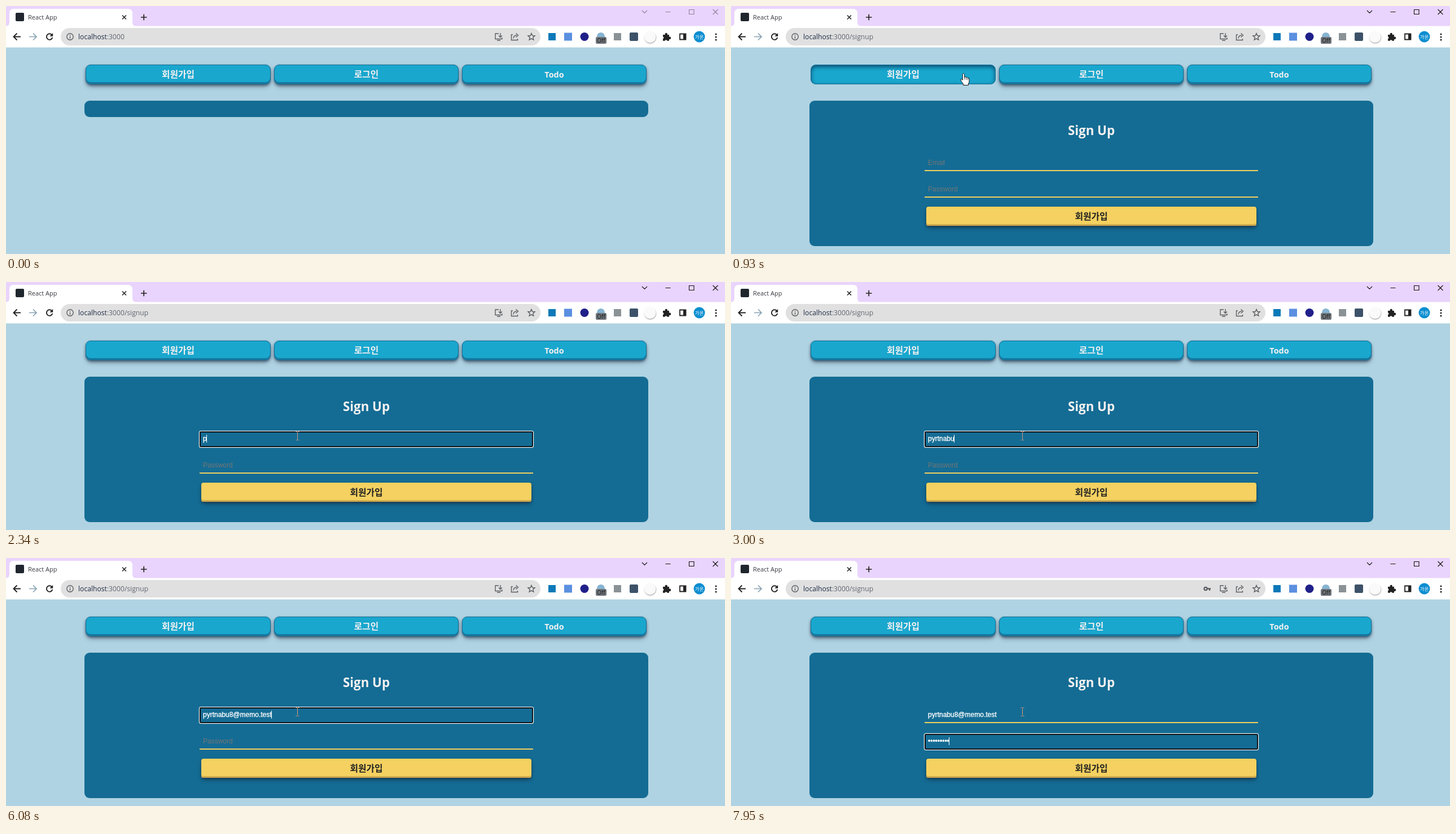
Recreate the animation shown at these times as an HTML page. Size 1274 by 440 pixels, loop 8 s.

```html
<!DOCTYPE html>
<html lang="ko">
<head>
<meta charset="utf-8">
<title>React App</title>
<style>
html, body { margin: 0; width: 100%; height: 100%; overflow: hidden; background: #afd3e2; }
#stage { position: relative; width: 1274px; height: 440px; overflow: hidden; }
#stage > * { position: absolute; box-sizing: border-box; }
svg { left: 0; top: 0; }
.panel { left: 139px; top: 168px; width: 999px; height: 29px; border-radius: 9px; background: #146c94; }
.nav, .submit {
  --k: 0;
  box-shadow:
    0 2px 4px rgba(25, 35, 60, calc(.55 * (1 - var(--k)))),
    0 6px 10px -3px rgba(25, 35, 60, calc(.45 * (1 - var(--k)))),
    inset 0 -3px 0 rgba(20, 90, 130, calc(.6 * (1 - var(--k)))),
    inset 0 3px 7px rgba(10, 65, 100, calc(.9 * var(--k)));
}
.nav { top: 104px; width: 328px; height: 35px; border: 1px solid #146c94; border-radius: 9px; background: #19a7ce; }
.submit {
  left: 346px; top: 356px; width: 585px; height: 34px; border-radius: 4px; background: #f4d160;
  box-shadow: 0 2px 4px rgba(25, 30, 50, .5), 0 6px 10px -3px rgba(25, 30, 50, .45), inset 0 -3px 0 #cfa94d;
}
.line { left: 343px; width: 591px; height: 2px; background: #f4d160; }
.ring {
  left: 342px; width: 593px; height: 30px; border: 1px solid #fff; border-radius: 3px;
  box-shadow: inset 0 0 0 2px #0b0f14, 0 0 1px #fff;
}
text { font-family: "Open Sans", "Noto Sans", "Noto Sans CJK KR", sans-serif; }
.ko { font: 700 15.8px "Noto Sans CJK KR", "Noto Sans CJK", sans-serif; text-anchor: middle; }
.field { font: 12px "Liberation Sans", Arial, sans-serif; }
.typed { fill: #fff; stroke: #fff; stroke-width: .35px; white-space: pre; }
.hint { fill: #757575; }
.ico { fill: none; stroke: #5a5d61; stroke-width: 1.4; }
</style>
</head>
<body>
<div id="stage">
  <div class="panel" id="panel"></div>
  <div class="nav" id="join" style="left:141px"></div>
  <div class="nav" style="left:475px;width:327px"></div>
  <div class="nav" style="left:808px;width:327px"></div>
  <div class="line form" style="top:291px"></div>
  <div class="line form" style="top:338px"></div>
  <div class="submit form"></div>
  <div class="ring" id="ring"></div>

  <svg width="1274" height="440" viewBox="0 0 1274 440">
    <!-- tab strip -->
    <rect width="1274" height="36" fill="#e9d4fd"/>
    <path d="M0 36Q6 36 6 28V13Q6 5 14 5H216Q224 5 224 13V28Q224 36 231 36Z" fill="#fff"/>
    <rect y="35.5" width="1274" height="38" fill="#fff"/>
    <rect x="17" y="12" width="15" height="15" rx="2" fill="#20262e"/>
    <text x="39" y="24" font-size="11" fill="#3a3a40">React App</text>
    <path d="M206 16.500l7 7m0-7l-7 7" stroke="#222" stroke-width="1.6"/>
    <path d="M239 20h10.500M244.250 14.750v10.500" stroke="#222" stroke-width="1.7"/>
    <g id="controls" fill="none" stroke-width="1.1">
      <path d="M1127 8l4.500 4.500 4.500-4.500M1168.500 10.500h9M1210.500 6.500h8.500v8h-8.500zM1252.500 6l9 9m0-9l-9 9"/>
    </g>

    <!-- toolbar -->
    <path d="M26 54.500H14M19.500 48.500l-6 6 6 6" fill="none" stroke="#222" stroke-width="1.9"/>
    <path d="M41 54.500h12M48 48.500l6 6-6 6" fill="none" stroke="#85a0b0" stroke-width="1.7"/>
    <path d="M81.500 51.500a5.300 5.300 0 1 0 .8 4.300" fill="none" stroke="#222" stroke-width="1.9"/>
    <path d="M83.200 48v5.800h-5.800z" fill="#222"/>
    <rect x="97" y="39" width="850" height="31" rx="15.500" fill="#e0e0e0"/>
    <g class="ico">
      <circle cx="113.500" cy="54.500" r="5.700"/>
      <path d="M113.500 53.800v4M113.500 51v1.500"/>
      <path d="M873 49h-6v9.500h12V56M870 61h6M876 48v7M873 52.500l3 3 3-3"/>
      <path d="M898 51h-2.500v9.500h11V58M899 57.500q.5-5.500 6-5.500M903.500 48.500l4 3.500-4 3.500"/>
      <path d="M931 48.500l1.800 4 4.300.4-3.300 2.900 1 4.300-3.800-2.300-3.800 2.300 1-4.300-3.300-2.900 4.300-.4z"/>
      <g id="key"><circle cx="841" cy="54.500" r="2.600" stroke-width="2.200"/><path d="M844 54.500h6M848 54.500v3.300" stroke-width="2.300"/></g>
    </g>
    <text x="128" y="59" font-size="12.150" fill="#5f6670"><tspan fill="#1c2a44">localhost</tspan>:3000<tspan id="path"></tspan></text>

    <rect x="961" y="48" width="13" height="13" fill="#0b79b8"/>
    <rect x="989" y="47.500" width="14" height="14" fill="#5b8fe0"/>
    <circle cx="1025" cy="54.500" r="7.500" fill="#20208a"/>
    <circle cx="1054" cy="54" r="7" fill="#86b4d2"/>
    <rect x="1045" y="55" width="19" height="12" rx="2" fill="#6f7479"/>
    <text x="1054.500" y="65" font-size="10" fill="#16181a" text-anchor="middle">Off</text>
    <rect x="1077" y="48" width="13" height="13" fill="#8b9295"/>
    <rect x="1105" y="47" width="15" height="15" rx="2" fill="#3d5268"/>
    <circle cx="1141.500" cy="56" r="11" fill="#c8c8c8"/>
    <circle cx="1141" cy="54.500" r="10.500" fill="#fafafa"/>
    <path d="M1164 51h3.800a2.200 2.200 0 1 1 3.900 0h3.300v3.800a2.200 2.200 0 1 1 0 3.900v3h-3.500a2.100 2.100 0 0 0-4 0H1164v-3.500a2.100 2.100 0 0 0 0-4z" fill="#222"/>
    <path d="M1194 49.500h10.500v10H1194z" fill="none" stroke="#222" stroke-width="1.800"/>
    <rect x="1200" y="49" width="5" height="11" fill="#222"/>
    <circle cx="1228.500" cy="54.500" r="10" fill="#0b8ed0"/>
    <text class="ko" x="1228.500" y="58" fill="#fff" style="font-size:8.500px;font-weight:400">가온</text>
    <g fill="#222"><circle cx="1258" cy="50" r="1.600"/><circle cx="1258" cy="55" r="1.600"/><circle cx="1258" cy="60" r="1.600"/></g>

    <!-- page -->
    <g fill="#f6f1f1">
      <text class="ko" x="305" y="127.300">회원가입</text>
      <text class="ko" x="638.500" y="127.300">로그인</text>
      <text x="971.500" y="127" font-size="14.400" font-weight="700" text-anchor="middle">Todo</text>
    </g>
    <g class="form">
      <text x="638.500" y="228.500" font-size="22.300" font-weight="700" fill="#f6f1f1" text-anchor="middle">Sign Up</text>
      <text class="field hint" id="mailHint" x="349" y="282">Email</text>
      <text class="field hint" id="passHint" x="349" y="329">Password</text>
      <text class="field typed" id="mail" x="349" y="282"></text>
      <text class="field typed" id="pass" x="349" y="329"></text>
      <rect id="caret" width="1" height="14" fill="#fff"/>
      <text class="ko" x="638.500" y="379.300" fill="#222">회원가입</text>
    </g>

    <!-- pointers, origin at the hot spot -->
    <g id="arrow" fill="#fff" stroke="#111" stroke-width=".9">
      <path d="M0 0V14.500L3.300 11.400 5.600 16.600 7.900 15.600 5.700 10.500H10.300Z"/>
    </g>
    <g id="hand" fill="#fff" stroke="#111" stroke-width="1" stroke-linejoin="round">
      <path d="M-1.700 1.500Q0-1.500 1.700 1.500V7Q3.500 5.300 4.800 7.400 6.600 6.200 7.700 8.300 9.800 7.600 10.100 10V14.500Q9.800 17 8.500 18.500V21H-.3V19Q-2.500 16.500-4.600 12.800-5.600 10.300-3.500 10.200-2.500 10.700-1.700 12Z"/>
      <path d="M1.700 7v4M4.800 7.500v4M7.700 8.500v3.500" fill="none" stroke-width=".8"/>
    </g>
    <g id="beam" fill="none" stroke="#d5997c" stroke-width="1">
      <path d="M-3-7.500H-1L0-6.500 1-7.500H3M0-6.500V6.500M-3 7.500H-1L0 6.500 1 7.500H3"/>
    </g>
  </svg>
</div>
<script>
const LOOP = 8000, FPS = 15;
const ADDRESS = 'pyrtnabu8@memo.test';
const $ = id => document.getElementById(id);
const forms = document.querySelectorAll('.form');

// time, typed text (or how many letters of it), caret visible
const mailSteps = [
  [0, 0, 0], [1600, 0, 1], [2130, 0, 0],
  [2340, 1, 1], [2400, 3, 1], [2470, 'pyroa', 1],
  [2670, 3, 1], [2740, 4, 1], [2800, 5, 1], [2870, 6, 1], [3000, 8, 1],
  [3540, 8, 0], [3870, 9, 1], [4340, 10, 1], [4670, 11, 1], [4740, 12, 1],
  [4880, 13, 1], [5000, 14, 1], [5070, 15, 1], [5610, 15, 0],
  [5740, 16, 1], [5810, 17, 1], [5940, 18, 1], [6080, 19, 1]
];
const passSteps = [
  [0, 0, 1], [6880, 0, 0], [7080, 2, 1], [7210, 3, 1],
  [7480, 4, 1], [7540, 5, 1], [7610, 6, 1], [7880, 8, 1], [7950, 9, 1]
];

// time, x, y, pointer shape
const route = [
  [66, 1180, 426, 'arrow'], [133, 980, 380, 'arrow'], [200, 725, 304, 'arrow'],
  [267, 590, 232, 'arrow'], [333, 495, 166, 'arrow'], [400, 450, 129, 'hand'],
  [467, 428, 123, 'hand'], [600, 412, 119.5, 'hand'], [1000, 412, 119.5, 'hand'],
  [1133, 428, 133, 'hand'], [1200, 450, 152, 'arrow'], [1333, 482, 208, 'arrow'],
  [1467, 494, 246, 'arrow'], [1600, 495, 268, 'beam'], [1670, 500, 269, 'beam'],
  [1870, 516.5, 273, 'beam']
];

const show = (el, on) => { el.style.visibility = on ? 'visible' : 'hidden'; };
const clamp = v => Math.min(1, Math.max(0, v));
const stepAt = (steps, t) => steps.reduce((a, s) => s[0] <= t ? s : a, steps[0]);

function setText(id, s) {
  if ($(id).textContent !== s) $(id).textContent = s;
}

function movePointer(t) {
  const i = route.reduce((a, r, n) => r[0] <= t ? n : a, -1);
  for (const id of ['arrow', 'hand', 'beam']) show($(id), i >= 0 && route[i][3] === id);
  if (i < 0) return;
  const a = route[i], b = route[i + 1] || a;
  const k = b === a ? 0 : (t - a[0]) / (b[0] - a[0]);
  const x = a[1] + (b[1] - a[1]) * k, y = a[2] + (b[2] - a[2]) * k;
  $(a[3]).setAttribute('transform', `translate(${x.toFixed(2)} ${y.toFixed(2)})`);
}

function render(t) {
  const open = t >= 930, onMail = t >= 1600 && t < 6340, onPass = t >= 6340;
  $('controls').setAttribute('stroke', t >= 800 ? '#111' : '#8d819b');
  setText('path', open ? '/signup' : '');
  $('panel').style.height = open ? '258px' : '29px';
  forms.forEach(el => show(el, open));
  $('join').style.setProperty('--k', clamp((t - 400) / 150) - clamp((t - 1190) / 150));

  const [, typed, mailCaret] = stepAt(mailSteps, t);
  const [, dots, passCaret] = stepAt(passSteps, t);
  setText('mail', typeof typed === 'string' ? typed : ADDRESS.slice(0, typed));
  setText('pass', '•'.repeat(dots));
  show($('mailHint'), open && !typed);
  show($('passHint'), open && !dots);
  show($('key'), t >= 7210);

  show($('ring'), onMail || onPass);
  $('ring').style.top = onPass ? '311px' : '264px';
  const caretOn = onMail ? mailCaret : onPass && passCaret;
  show($('caret'), caretOn);
  if (caretOn) {
    const width = $(onPass ? 'pass' : 'mail').getComputedTextLength();
    $('caret').setAttribute('x', Math.floor(349 + width));
    $('caret').setAttribute('y', onPass ? 318 : 271);
  }
  movePointer(Math.floor(t * FPS / 1000) * 1000 / FPS);
}

function tick() {
  render(performance.now() % LOOP);
  requestAnimationFrame(tick);
}
tick();
</script>
</body>
</html>
```
